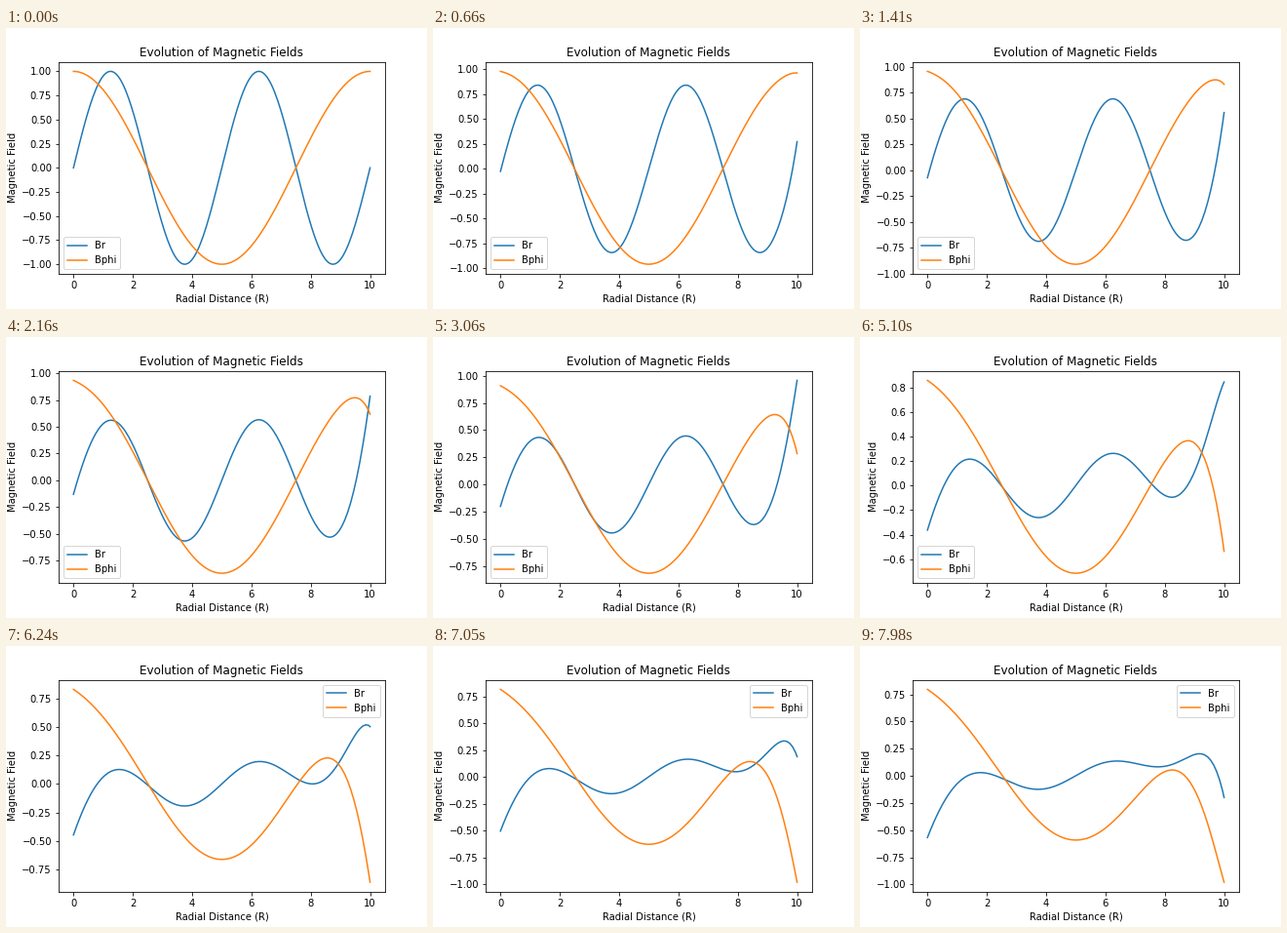
A matplotlib script for the animation above (8 s loop, 432x288 px).

```python
import numpy as np
import matplotlib.pyplot as plt
from matplotlib.animation import FuncAnimation

FRAMES = 267
LOOP_MS = 8000
ETA = 0.5      # magnetic diffusivity
SUBSTEPS = 2   # solver steps per frame
DT = 0.01 / SUBSTEPS
OMEGA = 2 * np.pi / 5

R = np.linspace(0, 10, 200)
DR = R[1] - R[0]


def diffuse(field):
    """One explicit diffusion step with one-sided differences at the ends."""
    return field + ETA * DT * np.gradient(np.gradient(field, DR), DR)


def evolve():
    br = np.sin(2 * np.pi * R / 5)
    bphi = np.cos(2 * np.pi * R / 10)
    states = [(br, bphi)]
    for step in range(1, (FRAMES - 1) * SUBSTEPS + 1):
        br, bphi = diffuse(br), diffuse(bphi)
        # The outer edge is driven by a rotating field.
        br[-1] = np.sin(OMEGA * step * DT)
        bphi[-1] = np.cos(OMEGA * step * DT)
        if step % SUBSTEPS == 0:
            states.append((br, bphi))
    return states


STATES = evolve()

fig, ax = plt.subplots(figsize=(6, 4), dpi=72)
fig.subplots_adjust(bottom=0.125)
lines = [ax.plot(R, field, label=name)[0]
         for field, name in zip(STATES[0], ("Br", "Bphi"))]
ax.set_title("Evolution of Magnetic Fields")
ax.set_xlabel("Radial Distance (R)")
ax.set_ylabel("Magnetic Field")
ax.legend(loc="best")


def update(n):
    for line, field in zip(lines, STATES[n]):
        line.set_data(R, field)
    ax.relim()
    ax.autoscale_view()
    return lines


def init():
    return update(0)


anim = FuncAnimation(fig, update, frames=FRAMES, init_func=init,
                     interval=LOOP_MS / FRAMES, repeat=True,
                     repeat_delay=0, blit=False)
plt.show()
```
